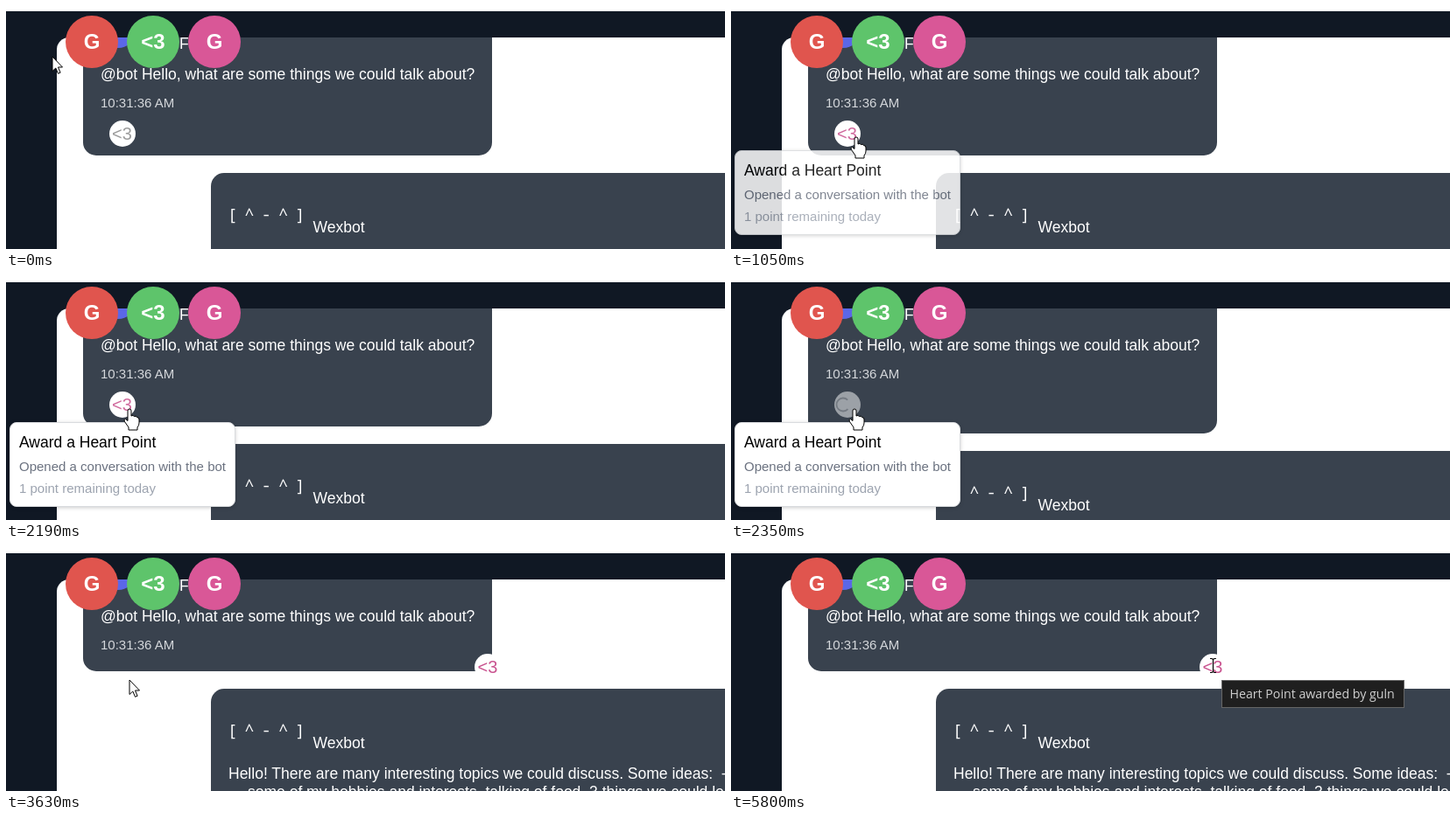
An HTML page that plays this animation: 821x278 px, repeating every 7030 ms.

```html
<!DOCTYPE html>
<html lang="en">
<head>
<meta charset="utf-8">
<style>
  html, body { margin: 0; width: 100%; height: 100%; overflow: hidden; background: #101824; }
  svg { display: block; width: 821px; height: 278px; }
  text { font: 17.5px "Liberation Sans", Arial, sans-serif; fill: #fff; white-space: pre; }
  .small { font-size: 15px; }
  .badge { font-size: 24px; font-weight: bold; text-anchor: middle; }
  .heart { font-size: 20px; text-anchor: middle; }
  .face { font: 18px "Noto Sans Mono", monospace; letter-spacing: -1.1px; }
  .hint { font: 14.2px "Open Sans", sans-serif; fill: #d0d0d0; }
  .bubble { fill: #39424e; }
  .pointer { fill: #fff; stroke: #000; stroke-linejoin: round; }
</style>
</head>
<body>
<svg viewBox="0 0 821 278">
  <rect width="821" height="278" fill="#101824"/>
  <rect x="58" y="36" width="800" height="300" rx="14" fill="#fff"/>

  <rect id="question" class="bubble" x="88" y="-60" width="467" rx="15"/>
  <circle cx="128" cy="28" r="20" fill="#5b67e8"/>
  <text x="198" y="49">F</text>
  <text x="108" y="84">@bot Hello, what are some things we could talk about?</text>
  <text x="108" y="116" class="small" style="fill:#d5d8dc">10:31:36 AM</text>

  <g id="answer">
    <rect class="bubble" x="234" width="700" height="300" rx="15"/>
    <text class="face" x="253" y="54">[ ^ - ^ ]</text>
    <text x="350.5" y="68">Wexbot</text>
    <text x="254" y="103">Hello! There are many interesting topics we could discuss. Some ideas:  - your</text>
    <text x="276" y="124">some of my hobbies and interests, talking of food, 3 things we could learn about</text>
  </g>

  <g id="button">
    <circle id="disc" cx="133" cy="146" r="15" fill="#fff"/>
    <text id="label" class="heart" x="132.5" y="153">&lt;3</text>
    <path id="spinner" d="M7.5 0A7.5 7.5 0 1 1 0 -7.5" fill="none" stroke="#747a82" stroke-width="1.8"/>
  </g>
  <g id="award">
    <circle cx="550" cy="136" r="15" fill="#fff"/>
    <text class="heart" x="550" y="143" style="fill:#c9538f">&lt;3</text>
  </g>

  <rect width="821" height="36" fill="#101824"/>
  <rect width="821" height="6" fill="#fff"/>
  <circle cx="98" cy="41" r="30" fill="#e0554e"/>
  <circle cx="168" cy="41" r="30" fill="#5ec46b"/>
  <circle cx="238" cy="41" r="30" fill="#d95797"/>
  <text class="badge" x="98" y="49">G</text>
  <text class="badge" x="168" y="49">&lt;3</text>
  <text class="badge" x="238" y="49">G</text>

  <g id="popover">
    <rect x="4.5" y="166.5" width="257" height="96" rx="7.5" fill="#fff" stroke="#d9dbde"
          style="filter:drop-shadow(0 1px 2px #0003)"/>
    <text x="15" y="195" style="fill:#000">Award a Heart Point</text>
    <text x="15" y="222" class="small" style="fill:#6b7280">Opened a conversation with the bot</text>
    <text x="15" y="247" class="small" style="fill:#9ca3af">1 point remaining today</text>
  </g>
  <g id="hint">
    <rect x="560.5" y="151.5" width="208" height="31" fill="#1f1f1f" stroke="#666"/>
    <text class="hint" x="569.5" y="172">Heart Point awarded by guln</text>
  </g>

  <g id="cursor">
    <path id="arrow" class="pointer" d="M0 0V16.5L3.8 13 6.5 19.3 9.1 18.2 6.5 12H11.5Z"/>
    <path id="hand" class="pointer" d="M-2 2Q-2 0 0 0T2 2V8Q4 6.5 5.5 8.5 8 7.5 8.7 9.7 11 9.3 11 12V16Q11 19 9 21V24H-1V21L-5.5 14.5Q-7 11.5 -4.5 11.5L-2 13.5Z"/>
    <path id="beam" d="M-3 -7.5H-1L.5 -6.5 2 -7.5H4M-3 8.5H-1L.5 7.5 2 8.5H4M.5 -6.5V7.5" fill="none" stroke="#000" stroke-width="1.2"/>
  </g>
</svg>
<script>
const LOOP = 7030, CLICK = 2350, AWARDED = 3630;
const $ = id => document.getElementById(id);
const show = (id, on) => $(id).style.display = on ? '' : 'none';
const clamp = v => Math.max(0, Math.min(1, v));

// Pointer stops: time, x, y
const stops = [
  [0, 53, 58], [80, 57, 65], [160, 75, 88], [240, 104, 121], [320, 130, 147],
  [400, 145, 154], [480, 146, 152], [720, 145, 151], [800, 143, 150], [1530, 141, 151],
  [4530, 180, 151], [4600, 295, 150], [4680, 373, 149], [4850, 395, 148], [4920, 440, 143],
  [5000, 490, 136], [5070, 522, 131], [5150, 536, 130], [5230, 546, 133], [5300, 550, 134]
];

function draw(t) {
  const loading = t >= CLICK && t < AWARDED;
  const awarded = t >= AWARDED;
  const bottom = awarded ? 141 : loading ? 179 : 171;
  $('question').setAttribute('height', bottom + 60);
  $('answer').setAttribute('transform', `translate(0 ${bottom + 20})`);

  show('button', !awarded);
  show('award', awarded);
  show('label', !loading);
  show('spinner', loading);
  $('disc').style.opacity = loading ? .5 : 1;
  $('label').style.fill = t < 400 ? '#9b9b9b' : '#d0699d';
  $('spinner').setAttribute('transform', `translate(128 146) rotate(${(t - 3230) * .36})`);

  const fadeIn = t < 960 ? 0 : clamp(.4 + (t - 960) / 200);
  const fadeOut = clamp((2840 - t) / 200);
  $('popover').style.opacity = Math.min(fadeIn, fadeOut);
  $('popover').setAttribute('transform', `translate(0 ${t < 1120 ? -1 : 0})`);
  show('hint', t >= 5800);

  const [, x, y] = stops.findLast(s => s[0] <= t);
  const overButton = t >= 400 && !awarded, overText = t >= 5230;
  $('cursor').setAttribute('transform', `translate(${x} ${y})`);
  show('hand', overButton);
  show('beam', overText);
  show('arrow', !overButton && !overText);
}

const start = performance.now();
function tick() {
  draw((performance.now() - start) % LOOP);
  requestAnimationFrame(tick);
}
tick();
</script>
</body>
</html>
```
